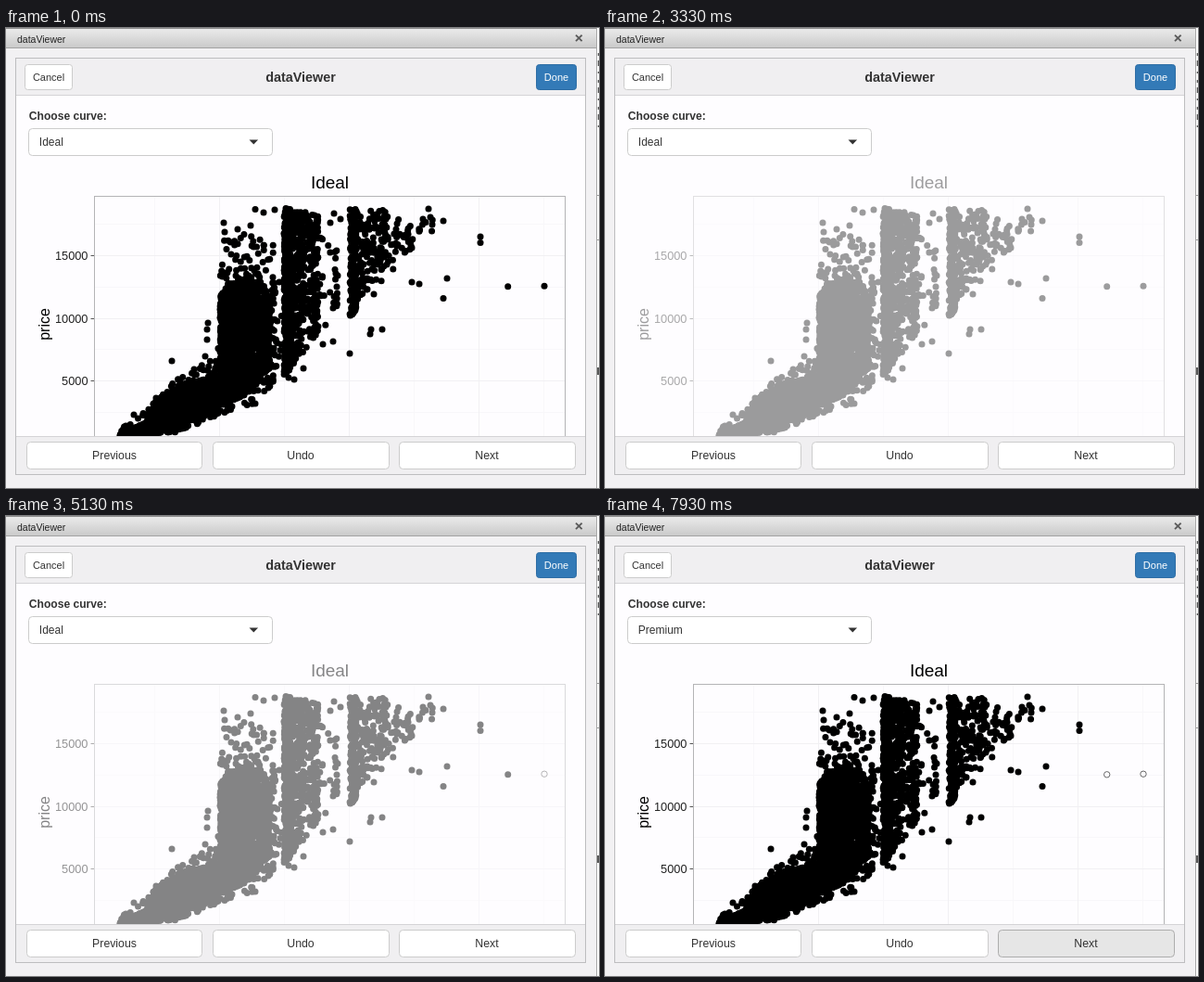
An HTML page with a canvas for the animation above (8 s loop, 640x496 px).

```html
<!DOCTYPE html>
<html lang="en">
<head>
<meta charset="utf-8">
<title>dataViewer</title>
<style>
  html, body { margin: 0; width: 100%; height: 100%; overflow: hidden; background: #fefdff; }
  canvas, svg { position: absolute; left: 0; top: 0; width: 640px; height: 496px; }
  text { font: 12.3px "Liberation Sans", Arial, sans-serif; fill: #333; }
  .mid { text-anchor: middle; }
  .end { text-anchor: end; }
  .btn { fill: #fff; stroke: #ccc; }
  .small { font-size: 11px; }
  .axis { font-size: 12.8px; fill: #222; }
  .dot { fill: #000; stroke: none; r: 3.5px; }
  .dot.off { fill: none; stroke: #444; stroke-width: .8; r: 3.2px; }
</style>
</head>
<body>
<canvas id="points" width="640" height="496"></canvas>
<svg viewBox="0 0 640 496">
  <defs>
    <linearGradient id="bar" x2="0" y2="1">
      <stop offset="0" stop-color="#ececec"/>
      <stop offset="1" stop-color="#cacaca"/>
    </linearGradient>
  </defs>

  <g id="labels">
    <text class="mid" x="349.5" y="173" style="font-size:19px;fill:#000">Ideal</text>
    <text class="axis end" x="88.5" y="250">15000</text>
    <text class="axis end" x="88.5" y="318">10000</text>
    <text class="axis end" x="88.5" y="385">5000</text>
    <text class="mid" transform="translate(47 319.5) rotate(-90)" style="font-size:16px;fill:#000">price</text>
    <circle class="dot" id="far" cx="581" cy="278.2"/>
    <circle class="dot" id="near" cx="541.7" cy="278.8"/>
  </g>

  <path fill="#f2f1f3" fill-rule="evenodd" d="M0 21H640V496H0ZM11 33V482H626V33Z"/>
  <rect width="638" height="21" fill="url(#bar)"/>
  <path stroke="#8f8f8f" d="M0 .5H638"/>
  <path stroke="#a3a3a3" d="M0 21.5H638"/>
  <path fill="#fff" d="M638 0h2v496h-2z"/>
  <path stroke="#a8a8a8" d="M637.5 0V496"/>
  <path stroke="#555" stroke-width="1.5" stroke-dasharray="3 5 6 6 2 7" d="M639.5 27V108"/>
  <path stroke="#999" d="M638 180.5h2M638 228.5h2"/>
  <path stroke="#222" stroke-width="1.5" d="M639 366v8"/>
  <path stroke="#5a5a5a" stroke-width="1.9" d="M615 7.6l6.6 6.6m0-6.6l-6.6 6.6"/>
  <text x="12" y="16" style="font-size:10.5px;fill:#222">dataViewer</text>

  <path fill="#f0eff1" d="M11 33H626V72H11ZM11 440H626V482H11Z"/>
  <path stroke="#d4d3d6" d="M11 72.5H626M11 440.5H626"/>
  <rect x="10.5" y="32.5" width="615" height="449" fill="none" stroke="#bdbdbf"/>

  <rect class="btn" x="20.5" y="39.5" width="51" height="27" rx="3"/>
  <text class="small mid" x="46" y="57">Cancel</text>
  <text class="mid" x="318" y="58" style="font-size:14.4px;font-weight:bold">dataViewer</text>
  <rect x="572.5" y="39.5" width="43" height="27" rx="3" fill="#337ab7" stroke="#2e6da4"/>
  <text class="small mid" x="594" y="57" style="fill:#fff">Done</text>

  <text x="24.8" y="99" style="font-size:12.1px;font-weight:bold">Choose curve:</text>
  <rect class="btn" x="24.5" y="108.5" width="263" height="29" rx="4"/>
  <text id="choice" x="35.8" y="127" style="font-size:12px">Ideal</text>
  <path fill="#333" d="M262.5 120.5h9.6l-4.8 5z"/>

  <rect class="btn" x="22.5" y="446.5" width="189" height="29" rx="4"/>
  <text class="mid" x="117" y="465">Previous</text>
  <rect class="btn" x="223.5" y="446.5" width="190" height="29" rx="4"/>
  <text class="mid" x="318" y="465">Undo</text>
  <rect class="btn" id="next" x="424.5" y="446.5" width="190" height="29" rx="4"/>
  <text class="mid" x="519" y="465">Next</text>
</svg>
<script>
const LOOP = 8000;
const FADES = [[3183, 3600], [5018, 5470]];
const HOVER = 7070, PRESS = 7470, PICK = 7670;

const $ = id => document.getElementById(id);
const canvas = $('points'), ctx = canvas.getContext('2d');

let seed = 11;
function rand() {
  seed = (seed * 16807) % 2147483647;
  return seed / 2147483647;
}

// Height of a polyline [x, y, x, y, ...] at x.
function level(line, x) {
  let i = 0;
  while (i < line.length - 4 && x > line[i + 2]) i += 2;
  const [x0, y0, x1, y1] = line.slice(i, i + 4);
  return y0 + (y1 - y0) * (x - x0) / (x1 - x0);
}

function dot(x, y) {
  ctx.beginPath();
  ctx.arc(x, y, 3.5, 0, 7);
  ctx.fill();
}

// Random points between two polylines; powers above 1 crowd the left / the bottom.
function cloud(n, top, bottom, px = 1, py = 1) {
  const x0 = top[0], x1 = top[top.length - 2];
  while (n--) {
    const x = x0 + (x1 - x0) * rand() ** px;
    const a = level(top, x), b = level(bottom, x);
    dot(x, b + (a - b) * rand() ** py);
  }
}

function lines(color, xs, ys) {
  ctx.strokeStyle = color;
  ctx.beginPath();
  for (const x of xs) { ctx.moveTo(x + .5, 182); ctx.lineTo(x + .5, 440); }
  for (const y of ys) { ctx.moveTo(96, y + .5); ctx.lineTo(604, y + .5); }
  ctx.stroke();
}

function drawPlot() {
  ctx.rect(11, 140, 614, 300);
  ctx.clip();
  lines('#f8f7fa', [160, 300, 440, 580], [211, 279, 346, 414]);
  lines('#f1f0f3', [230, 370, 510], [245, 313, 380]);
  ctx.strokeStyle = '#b4b4b6';
  ctx.strokeRect(95.5, 181.5, 508, 300);
  ctx.strokeStyle = '#555';
  ctx.beginPath();
  for (const y of [245.5, 313.5, 380.5]) { ctx.moveTo(91.5, y); ctx.lineTo(95, y); }
  ctx.stroke();

  ctx.fillStyle = '#000';
  // small stones
  cloud(1800, [123, 438, 150, 426, 163, 400, 180, 391, 205, 380, 229, 376],
    [123, 446, 180, 435, 200, 424, 229, 411]);
  cloud(45, [158, 402, 180, 382, 210, 364, 229, 342], [158, 408, 180, 390, 229, 375], 1, 1.6);
  cloud(14, [124, 432, 158, 408], [124, 438, 158, 418]);
  cloud(25, [170, 436, 229, 412], [170, 441, 229, 418]);
  // one carat
  cloud(1700, [231, 290, 240, 276, 262, 268, 275, 274, 285, 290],
    [231, 408, 250, 401, 270, 386, 285, 366], 1.2);
  cloud(28, [285, 275, 293, 285], [285, 376, 293, 364]);
  cloud(75, [230, 222, 260, 222, 290, 232], [230, 290, 262, 268, 288, 285], 1, 1.5);
  cloud(30, [231, 408, 272, 384, 290, 372], [231, 416, 272, 404, 290, 380]);
  // one and a half
  cloud(380, [300, 195, 307, 195], [300, 374, 307, 368]);
  cloud(300, [306, 195, 322, 200], [306, 366, 322, 350], 1.1);
  cloud(150, [323, 196, 337, 202], [323, 354, 337, 326]);
  cloud(26, [338, 215, 358, 235], [338, 335, 358, 305], 1.3);
  cloud(5, [294, 235, 299, 235], [294, 360, 299, 360]);
  // two and above
  cloud(160, [371, 195, 378, 195], [371, 312, 378, 304]);
  cloud(150, [377, 195, 412, 196], [377, 304, 390, 284, 412, 256], 1.4);
  cloud(42, [404, 197, 440, 206], [404, 275, 440, 236]);
  cloud(9, [434, 205, 461, 205], [434, 230, 461, 222]);

  const strays = [
    179, 359, 218, 318, 217, 325, 217, 336, 215, 354, 138, 417, 203, 368,
    269, 195.5, 278, 199, 290, 196, 235, 210, 236, 220, 250, 217, 264, 213,
    269, 405, 270, 384, 311, 379, 305, 377, 321, 367, 302, 194.5, 354, 200,
    361, 206, 350, 210, 353, 338, 342, 341, 358, 267, 357, 279, 371, 351,
    394, 325, 393, 330, 406, 325, 397, 287, 438, 274, 446, 276, 456, 195,
    458, 204, 460, 212, 472, 208, 476, 270, 472, 291.5, 512, 225, 512, 231.5
  ];
  for (let i = 0; i < strays.length; i += 2) dot(strays[i], strays[i + 1]);
}

// The CSS "ease" curve.
function ease(p) {
  if (p <= 0 || p >= 1) return p <= 0 ? 0 : 1;
  let lo = 0, hi = 1, u = .5;
  for (let i = 0; i < 16; i++) {
    u = (lo + hi) / 2;
    const x = .75 * u * (1 - u) + u ** 3;
    if (x < p) lo = u; else hi = u;
  }
  return .3 * u * (1 - u) ** 2 + 3 * u * u * (1 - u) + u ** 3;
}

function render(t) {
  let alpha = 1;
  for (const [from, to] of FADES) {
    if (t >= from && t < to) alpha = 1 - .7 * ease((t - from) / 250);
  }
  canvas.style.opacity = $('labels').style.opacity = alpha;
  $('far').classList.toggle('off', t >= FADES[0][1]);
  $('near').classList.toggle('off', t >= FADES[1][1]);
  $('choice').textContent = t < PICK ? 'Ideal' : 'Premium';

  const down = t >= PRESS && t < PICK;
  $('next').style.fill = t < HOVER ? '#fff' : down ? '#d4d4d4' : '#e6e6e6';
  $('next').style.stroke = t < HOVER ? '#ccc' : '#adadad';
}

function tick(now) {
  render(now % LOOP);
  requestAnimationFrame(tick);
}

drawPlot();
render(0);
requestAnimationFrame(tick);
</script>
</body>
</html>
```
